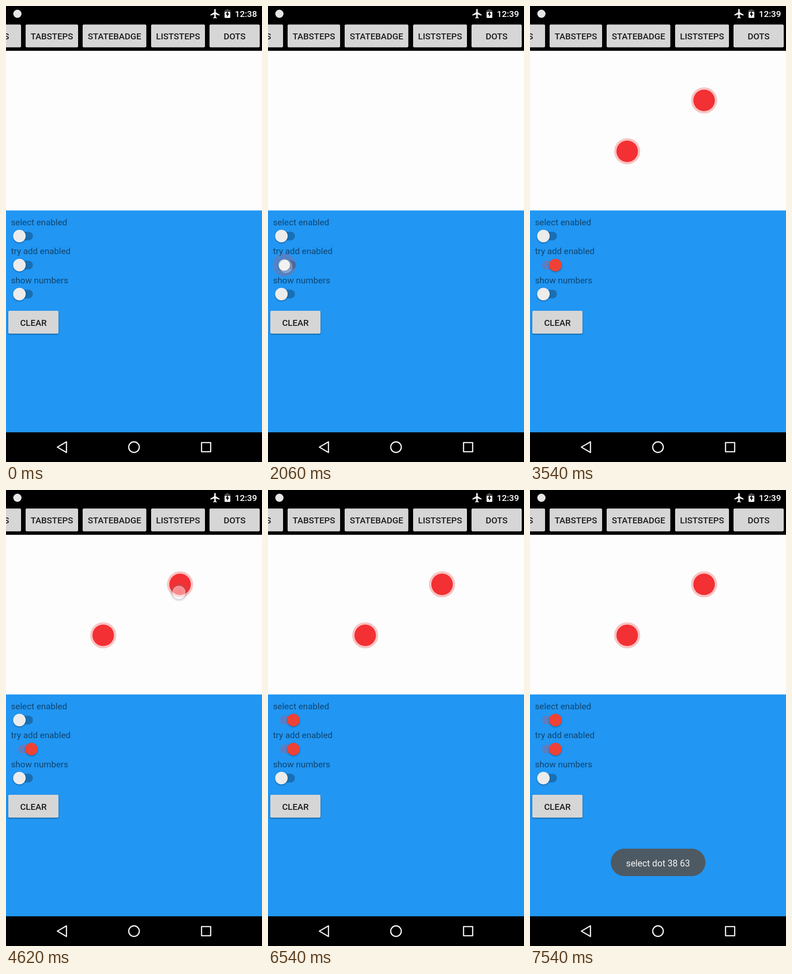
Write an HTML page with a canvas that moves like this. It is 561 px wide and 998 px high and loops after 8000 ms.

```html
<!DOCTYPE html>
<html lang="en">
<head>
<meta charset="utf-8">
<title>Dots demo</title>
<style>
html, body { margin: 0; width: 100%; height: 100%; overflow: hidden; background: #000; }
canvas { display: block; width: 561px; height: 998px; }
</style>
</head>
<body>
<canvas id="stage" width="561" height="998"></canvas>
<script>
const ctx = document.getElementById('stage').getContext('2d');
const LOOP = 8000;
const BLUE = '#2196f3';
const OFF = { thumb: [236, 236, 236], track: [25, 111, 179] };
const ON = { thumb: [238, 66, 54], track: [92, 125, 194] };

const buttons = [
  ['STEPS', -77, 110], ['TABSTEPS', 43, 115], ['STATEBADGE', 168, 139.5],
  ['LISTSTEPS', 318, 118], ['DOTS', 446, 110]
];
const switches = [
  { label: 'select enabled', y: 503.5, tap: 5900 },
  { label: 'try add enabled', y: 567, tap: 1820 },
  { label: 'show numbers', y: 630.5, tap: Infinity }
];
const dots = [
  { x: 213, y: 318, start: 2620 },
  { x: 381.5, y: 206.5, start: 3300 }
];
// Finger presses: position, time down, time up
const taps = [
  [39, 570, 1820, 1980], [215, 318, 2460, 2620], [383, 206, 3140, 3300],
  [379, 224, 4500, 4660], [384, 205, 5100, 5240], [39, 505, 5900, 6060],
  [214, 316, 6740, 6900]
];
const plane = new Path2D('M21 16v-2l-8-5V3.5c0-.83-.67-1.5-1.5-1.5S10 2.67 10 3.5V9l-8 5v2l8-2.5V19l-2 1.5V22l3.5-1 3.5 1v-1.5L13 19v-5.5l8 2.5z');

const clamp = v => Math.max(0, Math.min(1, v));
const smooth = v => 0.5 - Math.cos(Math.PI * clamp(v)) / 2;
const mix = (a, b, p) => `rgb(${a.map((v, i) => Math.round(v + (b[i] - v) * p))})`;

function rect(x, y, w, h, fill) {
  ctx.fillStyle = fill;
  ctx.fillRect(x, y, w, h);
}

function round(x, y, w, h, r, fill) {
  ctx.fillStyle = fill;
  ctx.beginPath();
  ctx.roundRect(x, y, w, h, r);
  ctx.fill();
}

function circle(x, y, r, fill) {
  ctx.fillStyle = fill;
  ctx.beginPath();
  ctx.arc(x, y, r, 0, Math.PI * 2);
  ctx.fill();
}

function poly(points) {
  ctx.beginPath();
  points.forEach(([x, y]) => ctx.lineTo(x, y));
  ctx.closePath();
}

function text(str, x, y, fill, weight = 400, align = 'left', size = 19.1) {
  ctx.font = `${weight} ${size}px Roboto, sans-serif`;
  ctx.textAlign = align;
  ctx.fillStyle = fill;
  ctx.fillText(str, x, y);
}

function shaded(blur, dy, alpha, draw) {
  ctx.save();
  ctx.shadowColor = `rgba(0,0,0,${alpha})`;
  ctx.shadowBlur = blur;
  ctx.shadowOffsetY = dy;
  draw();
  ctx.restore();
}

function button(label, x, y, w) {
  shaded(3, 1.5, 0.4, () => round(x, y, w, 50, 2.7, '#d6d6d6'));
  text(label, x + w / 2, y + 32.5, '#1c1c1c', 500, 'center');
}

function statusBar(t) {
  circle(25, 17, 9, '#e6e6e6');
  ctx.save();
  ctx.translate(446, 4.3);
  ctx.scale(1.04, 1.04);
  ctx.fillStyle = '#fff';
  ctx.fill(plane);
  ctx.restore();

  rect(482.5, 7, 5, 3, '#4c4a48');
  rect(479, 9, 12.5, 5, '#4c4a48');
  round(479, 13, 12.5, 13, [0, 0, 1.5, 1.5], '#fff');
  ctx.fillStyle = '#000';
  poly([[486.3, 11], [481.4, 18.8], [484.4, 18.8], [484.4, 24], [489.2, 16.4], [486.3, 16.4]]);
  ctx.fill();

  text(t < 1620 ? '12:38' : '12:39', 550, 24, '#fff', 500, 'right');
}

function navBar() {
  rect(0, 933, 561, 65, '#000');
  ctx.strokeStyle = '#f4f4f4';
  ctx.lineWidth = 2.6;
  ctx.lineJoin = 'round';
  poly([[112.5, 965.5], [132.5, 953.8], [132.5, 977.2]]);
  ctx.stroke();
  ctx.beginPath();
  ctx.arc(280.5, 965.5, 11.6, 0, Math.PI * 2);
  ctx.stroke();
  ctx.strokeRect(428.5, 955.5, 20, 20);
}

function toggle({ label, y, tap }, t) {
  text(label, 11, y - 24, 'rgba(0,0,0,0.54)');
  const p = smooth((t - tap - 160) / 250);
  const tint = clamp((p - 0.3) / 0.6);
  const x = 29.4 + 26.4 * p;
  round(26.5, y - 9.5, 32.5 + 7 * p, 19, 9.5, mix(OFF.track, ON.track, tint));

  const age = t - tap;
  if (age >= 0 && age < 640) {
    const alpha = 0.22 * (1 - clamp((age - 240) / 400));
    const r = 10 + 17 * smooth(age / 300);
    circle(x, y, r, age < 160 ? `rgba(0,0,0,${alpha / 2})` : `rgba(244,67,54,${alpha})`);
  }
  const size = 13.7 - 1.7 * Math.sin(Math.PI * p);
  shaded(3, 1.5, 0.35, () => circle(x, y, size, mix(OFF.thumb, ON.thumb, tint)));
}

function finger([x, y, down, up], t) {
  const alpha = 1 - clamp((t - up) / 240);
  if (t < down || alpha === 0) return;
  const g = ctx.createRadialGradient(x, y, 0, x, y, 21);
  g.addColorStop(0, 'rgba(255,255,255,0.42)');
  g.addColorStop(0.67, 'rgba(255,255,255,0.48)');
  g.addColorStop(0.71, 'rgba(110,110,120,0.28)');
  g.addColorStop(1, 'rgba(110,110,120,0)');
  ctx.globalAlpha = alpha;
  circle(x, y, 21, g);
  ctx.globalAlpha = 1;
}

function toast(t) {
  const alpha = smooth((t - 7000) / 500);
  if (alpha === 0) return;
  const label = 'select dot 38 63';
  ctx.save();
  ctx.globalAlpha = alpha;
  round(177, 785, 207.5, 60, 30, '#4d5a63');
  ctx.fontStretch = 'condensed';
  ctx.font = '400 21.8px Roboto, sans-serif';
  const size = 21.8 * Math.min(1, 140 / ctx.measureText(label).width);
  text(label, 280.5, 823.5, '#f4f4f4', 400, 'center', size);
  ctx.restore();
}

function draw(t) {
  rect(0, 0, 561, 998, '#000');
  statusBar(t);
  buttons.forEach(([label, x, w]) => button(label, x, 40.5, w));
  rect(0, 98, 561, 350, '#fdfdfd');
  rect(0, 447.5, 561, 485.5, BLUE);

  for (const { x, y, start } of dots) {
    if (t < start) continue;
    circle(x, y, 28.6, '#f8c4c4');
    circle(x, y, 23.6, '#f33034');
  }
  switches.forEach(s => toggle(s, t));
  button('CLEAR', 5, 667, 110);
  toast(t);
  navBar();
  taps.forEach(tap => finger(tap, t));
}

const begin = performance.now();
function frame() {
  draw((performance.now() - begin) % LOOP);
  requestAnimationFrame(frame);
}
frame();
</script>
</body>
</html>
```
